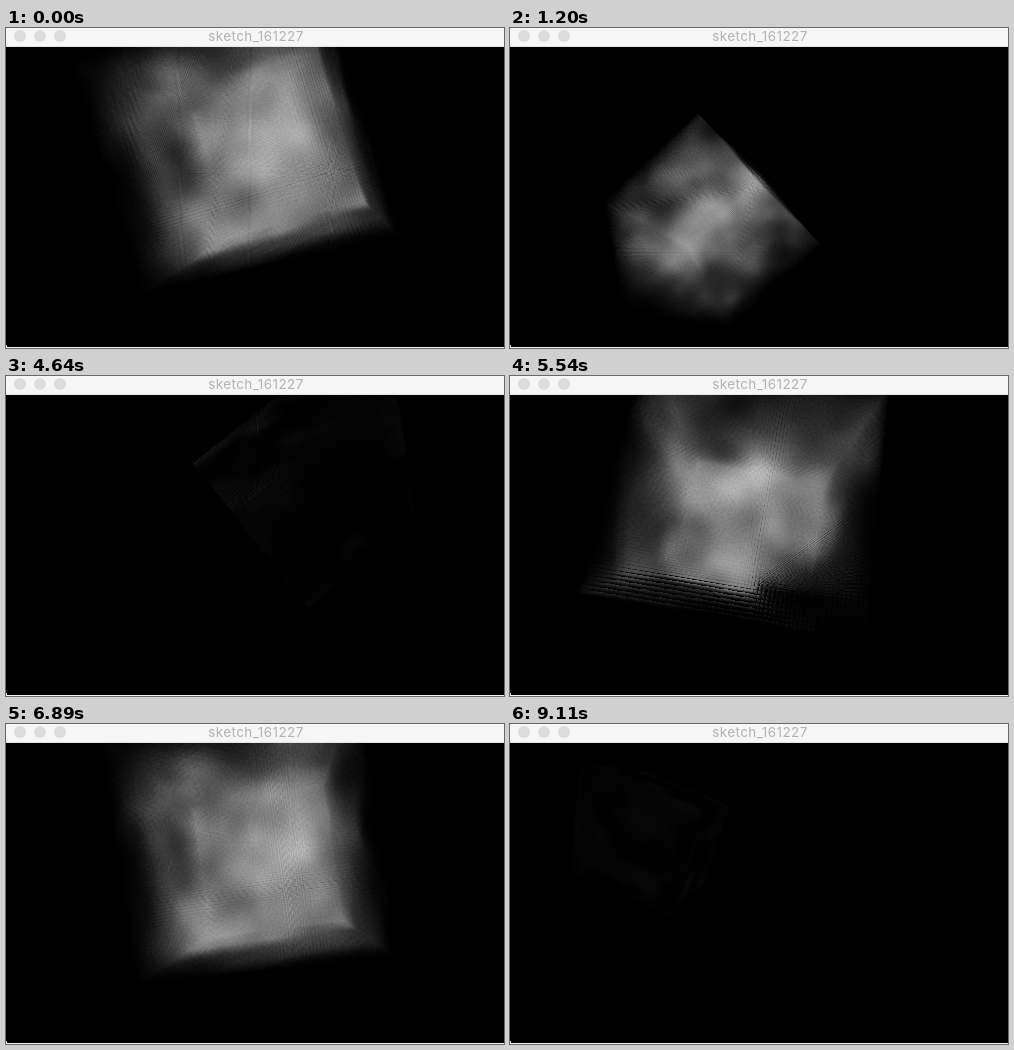
These frames come from a looping animation (498 px wide and 320 px high, 9210 ms). An HTML page with a canvas:

```html
<!DOCTYPE html>
<html lang="en">
<head>
<meta charset="utf-8">
<title>sketch_161227</title>
<style>
  html, body { margin: 0; width: 100%; height: 100%; overflow: hidden; background: #000; }
  canvas { position: absolute; left: 0; top: 19px; }
  .bar { position: absolute; left: 0; top: 0; width: 498px; height: 18px; background: #f6f6f6; border-bottom: 1px solid #e4e4e4; }
  .bar i { position: absolute; top: 2px; width: 12px; height: 12px; border-radius: 50%; background: #dcdcdc; }
  .bar span { position: absolute; left: 0; width: 500px; top: 0; text-align: center; color: #b3b3b3;
    font: 13.5px/17px Inter, Roboto, sans-serif; letter-spacing: .4px; }
  .foot { position: absolute; left: 0; top: 319px; width: 498px; height: 1px; background: #f4f4f4; }
  .foot::before { content: ""; position: absolute; left: 0; top: -2px; width: 1px; height: 2px; background: #ddd; }
</style>
</head>
<body>
<canvas width="498" height="300"></canvas>
<div class="bar">
  <i style="left:8px"></i><i style="left:28px"></i><i style="left:48px"></i>
  <span>sketch_161227</span>
</div>
<div class="foot"></div>
<script>
const W = 498, H = 300, LOOP = 9210;
const N = 64, GAP = 2;                 // points per side and their spacing
const CAMERA = 260, CX = 249, CY = 149; // distance and centre of the view
const PIVOT_X = -61, PIVOT_Y = -81;    // the cube turns about its first corner
const START = -0.3, SPIN = 0.14;       // radians, and radians per step

const ctx = document.querySelector('canvas').getContext('2d');
const image = ctx.createImageData(W, H);
const pixels = new Uint32Array(image.data.buffer);
const light = new Float32Array(W * H);
const depth = new Float32Array(W * H);

let seed = 161227;
function random() {
  seed = (Math.imul(seed, 1664525) + 1013904223) >>> 0;
  return seed / 4294967296;
}

const mix = (a, b, k) => a + (b - a) * k;
const ease = k => k * k * (3 - 2 * k);

// Smooth 3D value noise on a random lattice
function makeNoise(cell) {
  const side = N / cell + 1;
  const lattice = Float32Array.from({ length: side ** 3 }, random);
  const at = (x, y, z) => lattice[(z * side + y) * side + x];
  return (x, y, z) => {
    const [i, j, k] = [x, y, z].map(v => Math.floor(v / cell));
    const [u, v, w] = [x / cell - i, y / cell - j, z / cell - k].map(ease);
    const row = (b, c) => mix(at(i, b, c), at(i + 1, b, c), u);
    const sheet = c => mix(row(j, c), row(j + 1, c), v);
    return mix(sheet(k), sheet(k + 1), w);
  };
}

const coarse = makeNoise(16), fine = makeNoise(8);
const alpha = new Float32Array(N ** 3);
for (let z = 0, n = 0; z < N; z++)
  for (let y = 0; y < N; y++)
    for (let x = 0; x < N; x++)
      alpha[n++] = 0.042 * (0.7 * coarse(x, y, z) + 0.3 * fine(x, y, z)) ** 2;

// A see-through square that only covers what lies behind it
function splat(px, py, z, size, a) {
  const left = Math.round(px - size / 2), top = Math.round(py - size / 2);
  const x0 = Math.max(0, left), x1 = Math.min(W, left + size);
  const y0 = Math.max(0, top), y1 = Math.min(H, top + size);
  for (let y = y0; y < y1; y++) {
    for (let p = y * W + x0, end = y * W + x1; p < end; p++) {
      if (z < depth[p]) continue;
      depth[p] = z;
      light[p] += (255 - light[p]) * a;
    }
  }
}

// Turned by the same angle about the screen's axis and the cube's own y axis.
// Points go layer by layer, so the fog only builds up when later layers are nearer.
function drawCube(angle) {
  const c = Math.cos(angle) , s = Math.sin(angle);
  light.fill(0);
  depth.fill(-1e4);
  for (let k = 0, n = 0; k < N; k++) {
    for (let j = 0; j < N; j++) {
      for (let i = 0; i < N; i++, n++) {
        const reach = c * i + s * k;
        const x = PIVOT_X + GAP * (c * reach - s * j);
        const y = PIVOT_Y + GAP * (s * reach + c * j);
        const z = GAP * (c * k - s * i);
        const scale = CAMERA / (CAMERA - z);
        const size = Math.max(1, Math.round(GAP * scale));
        splat(CX + x * scale, CY + y * scale, z, size, alpha[n]);
      }
    }
  }
  for (let p = 0; p < pixels.length; p++)
    pixels[p] = 0xff000000 | Math.round(light[p]) * 0x010101;
  ctx.putImageData(image, 0, 0);
}

// The picture advances in hard steps and rests while the cube is dark
function stepAt(t) {
  return t < 3740 ? Math.min(15, Math.floor(t / 150)) : 25 + Math.floor((t - 3738) / 149.2);
}

let shown = -1;
function draw(now) {
  const step = stepAt(now % LOOP);
  if (step !== shown) {
    shown = step;
    drawCube(START + SPIN * step);
  }
  requestAnimationFrame(draw);
}
draw(0);
</script>
</body>
</html>
```
